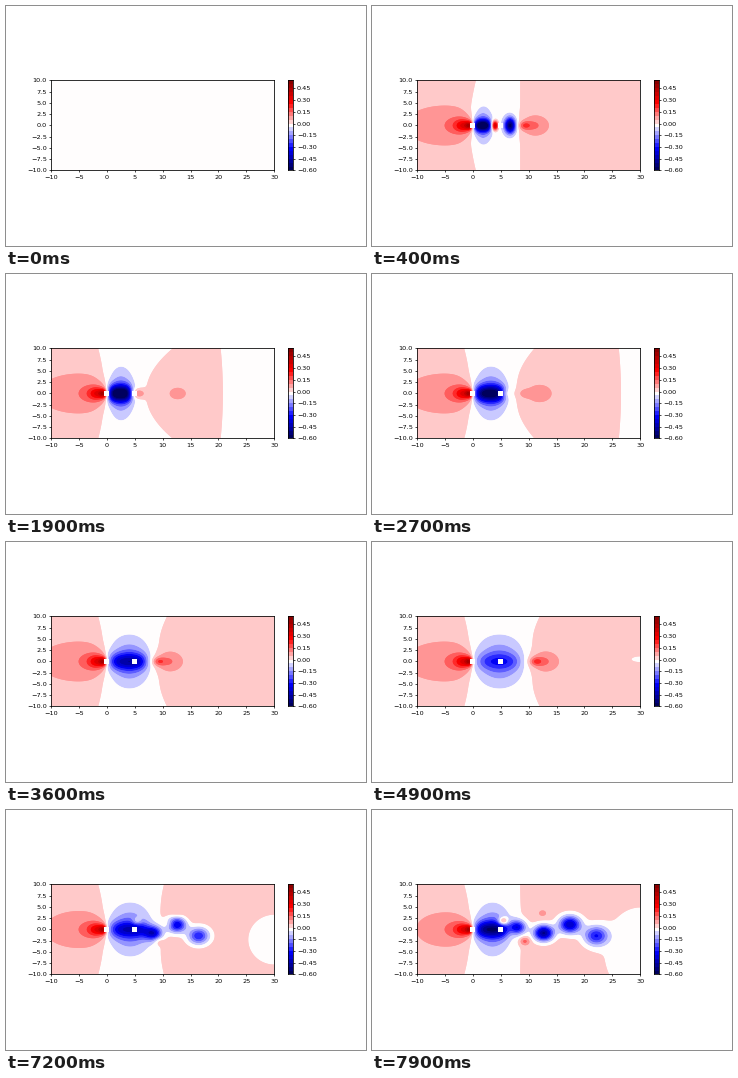
Animation of 360 by 240 pixels, one loop 8000 ms. Source, as a matplotlib script:

```python
import numpy as np
import matplotlib.pyplot as plt
from matplotlib.animation import FuncAnimation
from matplotlib.patches import Rectangle

FRAMES, STEP = 80, 100
PX = 0.72  # points per pixel at 100 dpi
LOW, HIGH = -0.6, 0.54
LEVELS = np.linspace(LOW, HIGH, 20)
X, Y = np.meshgrid(np.linspace(-10, 30, 241), np.linspace(-10, 10, 121))


def blob(a, x, y, sx, sy, power=2):
    return a * np.exp(-np.abs((X - x) / sx) ** power - ((Y - y) / sy) ** 2)


def edge(d, width):
    return 0.5 + 0.5 * np.tanh(d / (2 * width))


def ease(t, start, end):
    u = np.clip((t - start) / (end - start), 0, 1)
    return u * u * (3 - 2 * u)


def far_field(t, early, settle, shed):
    """Pale red, with a white band around the bodies and a passing front."""
    left = -0.45 + (0.01 - 0.021 * early) * Y**2
    right = 8.5 - 1.5 * early + 3 * ease(t, 1.9, 4.9) - 1.5 * shed
    bend = early * (0.048 - 0.028 * settle) - 0.02 * shed
    front = 20.8 + 9 * (t - 1.9) ** 2 - 0.004 * Y**2
    band = edge(X - left, 0.8) - edge(X - right - bend * Y**2, 0.8)
    return 0.03 - 0.06 * (band + edge(X - front, 0.8))


def stagnation(shed):
    rise = (blob(0.07, -5, 0, 7.8 - 2.2 * shed, 4.8 - 0.7 * shed)
            + blob(0.07, -2.8, 0, 2.0, 2.0)
            + blob(0.18, -1.6, 0, 1.4, 1.4)
            + blob(0.3, -0.5, 0, 0.8, 0.9))
    return rise * edge(-0.1 - 0.05 * Y**2 - X, 0.2)


def suction(t, early, shed):
    """A round halo and a flatter core that stretch as the wake grows."""
    reach = 1.8 + 3 * ease(t, 0.4, 5.2) - 1.3 * shed
    depth = 0.5 - 0.38 * ease(t, 1.9, 4.9) + 0.24 * shed
    halo = blob(0.18, reach, 0, 0.8 * reach, 3.3 + 1.2 * early)
    core = blob(depth, 0.95 * reach, 0, 0.82 * reach, 1.3 + 0.5 * early, 4)
    return (halo + core) * edge(X + 0.25, 0.2)


def recovery(t, early, lull, shed):
    late = ease(t, 3.6, 4.9)
    lift = ease(t, 5.2, 6.5)
    wide = blob(0.1 - 0.057 * lull, 11 + 1.7 * lull + 1.8 * late, 1.8 * lift,
                2.4, 2.1)
    tip = blob(0.13 * (1 - lull), 9.3 + 2 * late, 1.2 * lift, 1.1, 0.9)
    return (wide + tip) * (1 - shed)


def street(t):
    """Alternating vortices that drift away and widen with age."""
    total = 0
    for k in range(4):
        x = 8 + 4.7 * k - (6 + 0.23 * k**2) * (7.9 - t)
        y = (-1) ** k * (0.5 + 0.3 * k) * np.clip((x - 4) / 4, 0, 1)
        a = (0.55 - 0.025 * k**2) * np.clip((x - 5.5) / 4, 0, 1)
        size = 1.4 + 0.04 * max(x - 5, 0)
        total = total + blob(a, x, y, size, size)
    return total


def pressure(t):
    if t == 0:
        return np.full_like(X, -0.02)
    early, settle = ease(t, 0.9, 1.9), ease(t, 1.9, 3.6)
    shed = ease(t, 6.5, 7.9)
    lull = early * (1 - settle)

    p = far_field(t, early, settle, shed) + stagnation(shed)
    p += recovery(t, early, lull, shed) - suction(t, early, shed) - street(t)

    # short-lived flow around the second body
    p += blob(0.42 * (1 - early) + 0.14 * lull, 4 + 1.6 * early, 0,
              0.5 + 0.7 * early, 1)
    p -= blob(0.55 * (1 - early), 6.7, 0, 1, 1.75)

    # pockets left beside the shed vortices
    for a, x, y in ((0.27, 5.4, 1.8), (0.13, 9.3, -2.6), (0.05, 12.5, 3.6)):
        p += blob(a * shed, x, y, 0.9, 0.9)
    p -= blob(0.08 * ease(t, 3.8, 6), 30, 0.5 - 5.5 * shed,
              2.9 + 3.6 * shed, 1.2 + 8.8 * shed)
    return np.clip(p, LOW + 0.01, HIGH - 0.01)


def style(axis):
    axis.tick_params(labelsize=6.5 * PX, length=2.3 * PX, pad=2 * PX,
                     width=0.7 * PX)
    for spine in axis.spines.values():
        spine.set_linewidth(0.8 * PX)


plt.rcParams["font.family"] = "DejaVu Sans"
fig = plt.figure(figsize=(3.6, 2.4), dpi=100, facecolor="white")
BOTTOM, HEIGHT = 0.3146, 0.375

ax = fig.add_axes([0.125, BOTTOM, 0.62, HEIGHT])
ax.set(xlim=(-10, 30), ylim=(-10, 10), xticks=np.arange(-10, 31, 5),
       yticks=np.arange(-10, 10.1, 2.5))
ax.yaxis.set_major_formatter("{x:.1f}")
style(ax)

cax = fig.add_axes([0.784, BOTTOM, 0.0127, HEIGHT])
bounds = np.linspace(-0.6, 0.55, 24)
cax.pcolormesh([0, 1], bounds, (bounds[:-1, None] + bounds[1:, None]) / 2,
               cmap="seismic", vmin=-0.6, vmax=0.55)
cax.set(xticks=[], ylim=(-0.6, 0.55))
cax.yaxis.tick_right()
cax.set_yticks(0.15 * np.arange(-4, 4))
cax.yaxis.set_major_formatter("{x:.2f}")
style(cax)

bodies = [ax.add_patch(Rectangle((x, -0.5), 0.9, 1, fc="white", lw=0, zorder=2))
          for x in (-0.45, 4.5)]
layers = []


def draw(i):
    while layers:
        layers.pop().remove()
    p = pressure(i * STEP / 1000)
    # the plain pass hides seams left by the smooth one
    for smooth in (False, True):
        layers.append(ax.contourf(X, Y, p, LEVELS, cmap="seismic",
                                  antialiased=smooth, zorder=1))
    for body in bodies:
        body.set_visible(i > 0)
    ax.set(xlim=(-10, 30), ylim=(-10, 10))
    return []


anim = FuncAnimation(fig, draw, frames=FRAMES, interval=STEP,
                     init_func=lambda: draw(0), repeat=True, repeat_delay=0)
plt.show()
```
